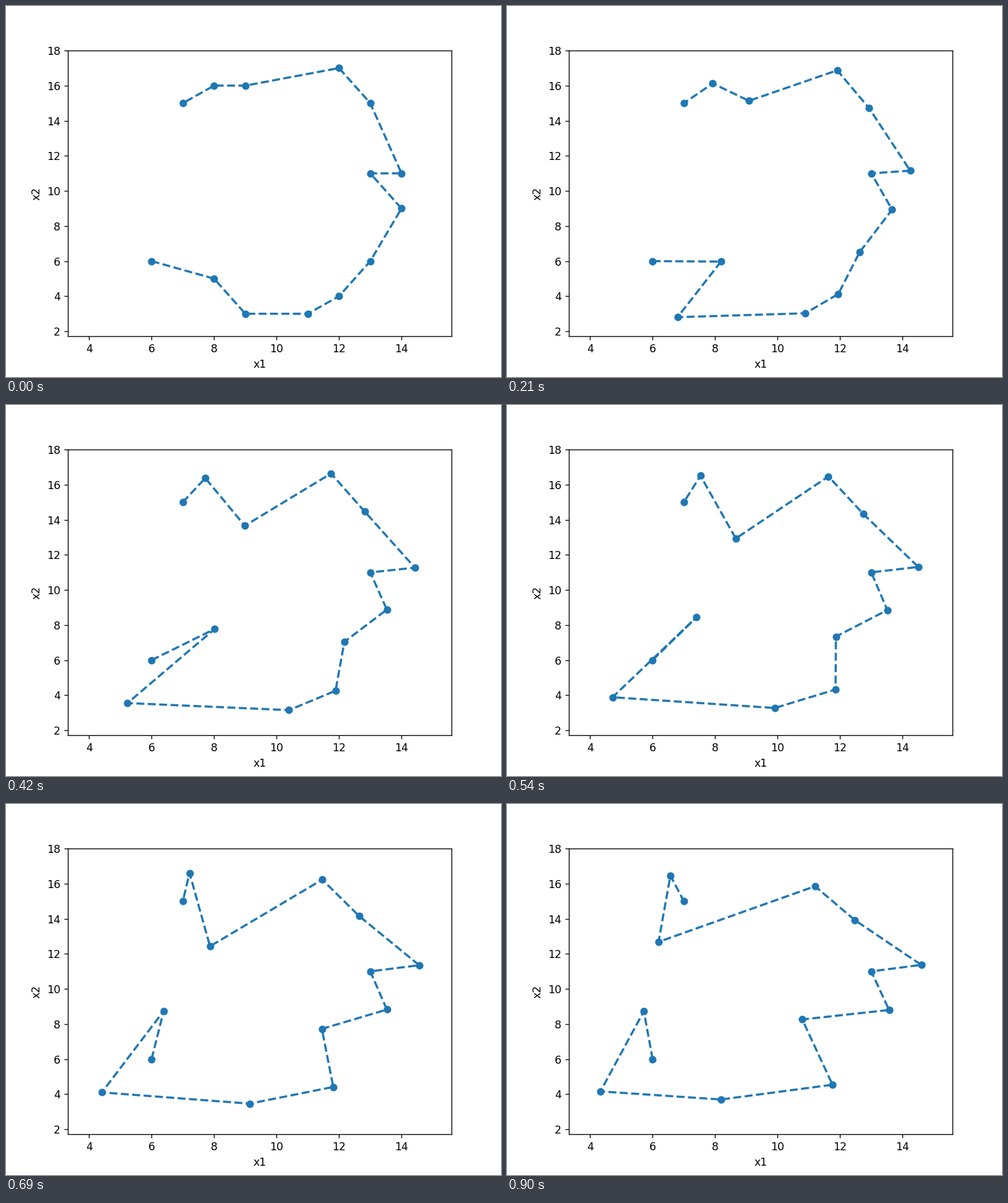
A matplotlib script that plays this animation: 800x600 px, repeating every 0.93 s.

```python
import numpy as np
import matplotlib.pyplot as plt
from matplotlib.animation import FuncAnimation

FRAMES = 31
INTERVAL = 30


def node(start, end=None, bend=None, rise=1, settle=1):
    """Return a function of progress t that moves along a quadratic Bezier.

    A larger rise starts more slowly, a larger settle stops more gently.
    """
    start = np.array(start, dtype=float)
    end = start if end is None else np.array(end)
    bend = (start + end) / 2 if bend is None else np.array(bend)

    def position(t):
        s = 1 - (1 - t ** rise) ** settle
        return (1 - s) ** 2 * start + 2 * s * (1 - s) * bend + s * s * end

    return position


# Nodes in chain order; those without an end stay fixed.
NODES = [
    node((6, 6)),
    node((8, 5), (5.72, 8.73), bend=(9, 9), rise=2, settle=2.5),
    node((9, 3), (4.33, 4.16), bend=(7.4, 1.9), settle=3),
    node((11, 3), (8.19, 3.7), rise=2.5, settle=1.5),
    node((12, 4), (11.76, 4.54)),
    node((13, 6), (10.79, 8.26), bend=(12.3, 7.1)),
    node((14, 9), (13.57, 8.8), bend=(13.35, 8.9), settle=1.5),
    node((13, 11)),
    node((14, 11), (14.6, 11.37), settle=2),
    node((13, 15), (12.48, 13.91), bend=(12.87, 14.4)),
    node((12, 17), (11.2, 15.85), rise=1.5),
    node((9, 16), (6.19, 12.68), bend=(9.62, 11.38), rise=1.7, settle=1.2),
    node((8, 16), (6.57, 16.46), bend=(7.5, 16.9), rise=1.8),
    node((7, 15)),
]

fig, ax = plt.subplots(figsize=(6.4, 4.8), dpi=125)
ax.set_xlim(3.32, 15.6)
ax.set_ylim(1.722, 18)
ax.set_xlabel("x1")
ax.set_ylabel("x2")
chain, = ax.plot([], [], color="#1f77b4", marker="o", ls="--", lw=2)


def update(frame):
    t = frame / (FRAMES - 1)
    chain.set_data(*np.transpose([position(t) for position in NODES]))
    return chain,


anim = FuncAnimation(fig, update, frames=FRAMES, interval=INTERVAL,
                     repeat=True, repeat_delay=0)
plt.show()
```
